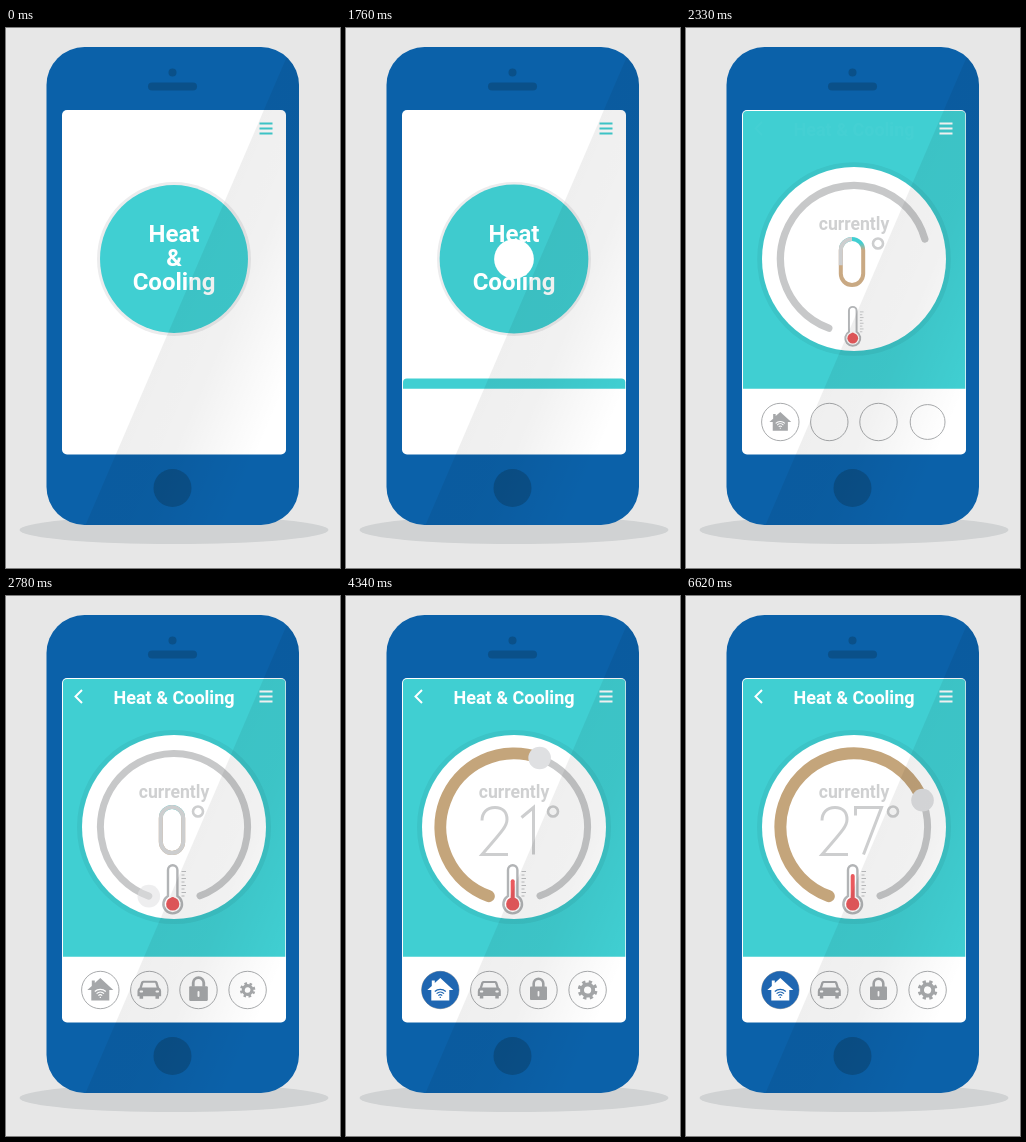
Write an HTML page that moves like this. It is 334 by 540 pixels and loops after 8000 ms.

```html
<!DOCTYPE html>
<html lang="en">
<head>
<meta charset="utf-8">
<title>Heat &amp; Cooling</title>
<style>
  html, body { margin: 0; width: 100%; height: 100%; overflow: hidden; background: #e7e7e7; }
  svg { display: block; width: 334px; height: 540px; }
  text { font-family: Roboto, "Open Sans", sans-serif; font-weight: 700; text-anchor: middle; }
</style>
</head>
<body>
<svg viewBox="0 0 334 540" fill="none">
  <defs>
    <clipPath id="phone"><rect x="40.5" y="19" width="252.5" height="478" rx="38"/></clipPath>
    <clipPath id="upper"><rect x="56" y="82" width="224" height="278.8"/></clipPath>
    <linearGradient id="shade" gradientUnits="userSpaceOnUse" x1="180" y1="262" x2="300" y2="313">
      <stop offset="0" stop-opacity=".062"/>
      <stop offset=".4" stop-opacity=".055"/>
      <stop offset="1" stop-opacity="0"/>
    </linearGradient>
    <linearGradient id="warm" gradientUnits="userSpaceOnUse" x1="0" y1="211" x2="0" y2="222">
      <stop offset=".35" stop-color="#40cfd2"/>
      <stop offset="1" stop-color="#c9a983"/>
    </linearGradient>
  </defs>

  <ellipse cx="168" cy="502" rx="154.5" ry="14" fill="#d0d2d3"/>
  <rect x="40.5" y="19" width="252.5" height="478" rx="38" fill="#0b61a9"/>
  <g fill="#0a5089">
    <circle cx="166.5" cy="44.5" r="4"/>
    <rect x="142" y="54.5" width="49" height="8" rx="4"/>
    <circle cx="166.5" cy="460" r="19"/>
  </g>
  <rect x="56" y="82" width="224" height="344.5" rx="5" fill="#fff"/>

  <g clip-path="url(#upper)">
    <rect id="panel" x="57" width="222.3" height="290" rx="4" fill="#40cfd2"/>
  </g>
  <g id="header" fill="#fff">
    <text x="168" y="107.6" font-size="18">Heat &amp; Cooling</text>
    <path d="M76 94L69.5 100.5L76 107" fill="none" stroke="#fff" stroke-width="2"/>
  </g>
  <path id="menu" d="M253.5 95.5h13M253.5 100.5h13M253.5 105.5h13" stroke-width="2"/>

  <!-- dial -->
  <circle id="halo" cx="168" cy="231" r="77" fill="#ececed"/>
  <circle id="disc" cx="168" cy="231"/>
  <g id="title" fill="#fff" font-size="24">
    <text x="168" y="214.3">Heat</text>
    <text x="168" y="238.3">&amp;</text>
    <text x="168" y="262.3">Cooling</text>
  </g>
  <g stroke="#40cfd2" stroke-width="5.5" stroke-linecap="round">
    <path id="spinA"/><path id="spinB"/>
  </g>
  <circle id="face" cx="168" cy="231" fill="#fff"/>
  <path id="track" stroke="#c7c8c9" stroke-linecap="round"/>
  <path id="heat" stroke="#c4a57b" stroke-width="12" stroke-linecap="round"/>
  <circle id="knob" r="11.3" fill="#dfe0e2"/>
  <g id="label"><text x="168" y="202" font-size="17.6" fill="#cfd0d1">currently</text></g>
  <g id="zero" stroke-width="4">
    <path id="zeroWarm" pathLength="1" stroke="url(#warm)"/>
    <path id="zeroGrey" pathLength="1" stroke="#cdcecf"/>
  </g>
  <g id="digits" stroke="#cdcecf" stroke-width="3" role="img"><path/><path/></g>
  <g id="degree"><circle r="5" stroke="#cdcecf" stroke-width="2.6"/></g>

  <g id="thermo">
    <path d="M162 300V274a4.7 4.7 0 0 1 9.4 0V300a9.3 9.3 0 1 1 -9.4 0Z" fill="#fff" stroke="#b2b4b6" stroke-width="2.4"/>
    <circle cx="166.7" cy="308" r="6.6" fill="#ea5a5d"/>
    <path id="column" stroke="#ea5a5d" stroke-width="4" stroke-linecap="round"/>
    <path id="ticks" stroke="#bfc0c2"/>
  </g>

  <!-- navigation -->
  <g id="nav">
    <g transform="translate(94.3 394)">
      <circle r="18.7" fill="#fff" stroke="#a9abad"/>
      <circle id="active" r="18.7" fill="#1f66b1"/>
      <g class="icon" id="house">
        <path fill="currentColor" d="M0-12L13 0H9V10.500H-9V0H-13L-8.500-4V-9.500H-5.500V-7Z"/>
        <g id="wifi" stroke-width="1.200">
          <path d="M-5.500 1.500A8 8 0 0 1 5.500 1.500M-3.700 3.600A5.400 5.400 0 0 1 3.700 3.600M-1.900 5.600A2.800 2.800 0 0 1 1.900 5.600M-.6 7.300h1.200"/>
        </g>
      </g>
    </g>
    <g transform="translate(143.300 394)">
      <circle r="18.7" fill="#fff" stroke="#a9abad"/>
      <g class="icon">
        <path fill="#a5a7a9" d="M-6-9H6Q7.500-9 8-7.500L9.500-2.500Q11.500-1.500 11.500 1V6H9.500V8.500H6V6H-6V8.500H-9.500V6H-11.500V1Q-11.500-1.500-9.500-2.500L-8-7.500Q-7.500-9-6-9Z"/>
        <path fill="#fff" d="M-5.700-7H5.700L7.200-2.500H-7.200Z"/>
        <path stroke="#fff" stroke-width="2" stroke-linecap="round" d="M-8.500 1.500h1.500M7 1.500h1.500"/>
      </g>
    </g>
    <g transform="translate(192.500 394)">
      <circle r="18.7" fill="#fff" stroke="#a9abad"/>
      <g class="icon">
        <rect x="-8.500" y="-3.500" width="17" height="13.500" rx="1" fill="#a5a7a9"/>
        <path stroke="#a5a7a9" stroke-width="2.600" d="M-4.800-3V-6.500a4.800 4.800 0 0 1 9.600 0V-3"/>
        <path stroke="#fff" stroke-width="1.800" stroke-linecap="round" d="M0 1.800V5.500"/>
      </g>
    </g>
    <g transform="translate(241.600 394)">
      <circle r="18.700" fill="#fff" stroke="#a9abad"/>
      <g class="icon"><g id="gear" stroke="#a5a7a9">
        <circle r="5.600" stroke-width="4"/>
        <circle r="8.100" stroke-width="3.600" pathLength="16" stroke-dasharray="1"/>
      </g></g>
    </g>
  </g>

  <path clip-path="url(#phone)" d="M285 19H293V497H79.500Z" fill="url(#shade)"/>
</svg>

<script>
const $ = id => document.getElementById(id);
const set = (el, attrs) => { for (const k in attrs) el.setAttribute(k, attrs[k]); };
const lerp = (a, b, p) => a + (b - a) * p;
const show = (el, on) => { el.style.display = on ? '' : 'none'; };

const linear = x => x;
const quad = x => x < .5 ? 2 * x * x : 1 - 2 * (1 - x) ** 2;
const cubic = x => x < .5 ? 4 * x ** 3 : 1 - 4 * (1 - x) ** 3;
const backOut = x => 1 + 2.7 * (x - 1) ** 3 + 1.7 * (x - 1) ** 2;
const lateSmooth = x => { const y = x ** 1.68; return y * y * (3 - 2 * y); };
const tween = (t, from, to, ease = quad) =>
  ease(Math.min(1, Math.max(0, (t - from) / (to - from))));

const LOOP = 8000, CX = 168, CY = 231, R = 73.6, START = 110;
const polar = (r, deg) => {
  const a = deg * Math.PI / 180;
  return [CX + r * Math.cos(a), CY + r * Math.sin(a)];
};
const arc = (r, from, span) =>
  `M${polar(r, from)}A${r} ${r} 0 ${span > 180 ? 1 : 0} 1 ${polar(r, from + span)}`;
const mix = (a, b, p) => `rgb(${a.map((v, i) => Math.round(lerp(v, b[i], p)))})`;
const scaleAt = (x, y, s) => `translate(${x} ${y}) scale(${s}) translate(${-x} ${-y})`;

const TEAL = [64, 207, 210], RING = [60, 196, 199], WHITE = [255, 255, 255];
const GREY = [165, 167, 169], BLUE = [31, 102, 177];

// Thin numerals as strokes in a 26 x 47 box; 9 is 6 turned round.
const GLYPHS = [
  'M13 0C4 0 0 5 0 13V34C0 42 4 47 13 47S26 42 26 34V13C26 5 22 0 13 0Z',
  'M6 10L18 0V47',
  'M0 13C0 5 5 0 13 0S25 5 25 12 19 25 0 47H26',
  'M1 9A12 11 0 1 1 12 22A13 12.5 0 1 1 0 36',
  'M16 0L0 36H26M19 22V47',
  'M24 0H3L2 21A13 15 0 1 1 0 37',
  'M18 0L2 27A13 14 0 1 0 6 22',
  'M0 8V0H26L8 47',
  'M13 22A12 11 0 1 1 13.1 22A13 12.5 0 1 1 13 22'
];

const zeroPath = 'M166 211a11.2 11.2 0 0 0 -11.2 11.2v23.6a11.2 11.2 0 0 0 22.4 0v-23.6a11.2 11.2 0 0 0 -11.200 -11.200';
set($('zeroWarm'), { d: zeroPath });
set($('zeroGrey'), { d: zeroPath });
set($('ticks'), { d: Array.from({ length: 8 }, (_, i) =>
  `M175.500 ${275.500 + i * 3.500}h${i % 2 ? 3 : 4.500}`).join('') });

const navItems = [...$('nav').children];
const icons = [...document.querySelectorAll('.icon')];
const digitPaths = [...$('digits').children];

function drawNumber(n) {
  const chars = [...String(n)].map(Number);
  set($('digits'), { 'aria-label': n });
  digitPaths.forEach((path, i) => {
    show(path, i < chars.length);
    if (i >= chars.length) return;
    const x = chars.length > 1 ? 136 + i * 33.5 : 153;
    const flip = chars[i] === 9;
    set(path, {
      d: GLYPHS[flip ? 6 : chars[i]],
      transform: `translate(${x} 211.500)` + (flip ? ' rotate(180 13 23.500)' : '')
    });
  });
}

function drawTrim(el, p) {
  show(el, p > 0);
  set(el, { 'stroke-dasharray': p < 1 ? `${p} 2` : 'none' });
}

function drawSpinner(t) {
  const grow = tween(t, 500, 1220, linear), out = tween(t, 1270, 1560);
  const tail = 23 - 180 * (1 - grow) + tween(t, 1220, 1560, linear) * 85;
  [['spinA', 180, 63.6], ['spinB', 0, 106]].forEach(([id, offset, span]) => {
    const len = span * grow * (1 - out);
    show($(id), len > .5);
    set($(id), { d: arc(85, tail + offset + span * out, len) });
  });
}

function drawDial(t) {
  const face = 92 * tween(t, 1500, 2294);
  show($('halo'), t < 1950);
  show($('title'), face < 75);
  set($('disc'), {
    r: lerp(74, 97, tween(t, 1700, 2374)),
    fill: mix(TEAL, RING, tween(t, 1600, 2000))
  });
  set($('face'), { r: face });

  const drawn = tween(t, 1950, 2550);
  show($('track'), drawn > 0);
  set($('track'), {
    d: arc(R, START, 319.300 * drawn),
    'stroke-width': lerp(8, 7, tween(t, 2060, 2500))
  });
  const label = tween(t, 1880, 2240);
  set($('label'), { transform: scaleAt(168, 195.500, label) });
  drawTrim($('zeroWarm'), tween(t, 1850, 2260, linear));
  drawTrim($('zeroGrey'), tween(t, 2220, 2620, linear));
}

function drawReading(t) {
  const rise = tween(t, 3350, 4520, cubic);
  const drop = tween(t, 4850, 5600, lateSmooth);
  const again = tween(t, 5900, 6620, cubic);
  const follow = (a, b, c, d) => lerp(lerp(lerp(a, b, rise), c, drop), d, again);
  const sweep = follow(0, 183, 119.700, 228.600);
  const value = Math.round(follow(0, 21, 18, 27));

  show($('heat'), rise > 0);
  set($('heat'), { d: arc(R, START, Math.max(.1, sweep)) });
  const [cx, cy] = polar(R, START + sweep);
  set($('knob'), { cx, cy, opacity: tween(t, 2640, 2900, linear) });

  const counting = t >= 3350;
  show($('zero'), !counting);
  show($('digits'), counting);
  if (counting) drawNumber(value);

  const x = value > 9 ? 207 : 192;
  set($('degree'), { transform: `translate(${x} 215.500) scale(${tween(t, 1950, 2250)})` });

  set($('thermo'), { transform: scaleAt(167, 320, tween(t, 1950, 2500)) });
  set($('column'), { d: `M166.700 308V${follow(303, 285, 288, 280)}` });
}

function drawNav(t) {
  navItems.forEach((item, i) => {
    const from = 1950 + i * 70;
    item.firstElementChild.setAttribute('r', 18.700 * tween(t, from, from + 210));
    show(item, t > from);
    const s = tween(t, 2200 + i * 155, 2700 + i * 155, backOut);
    set(icons[i], { transform: `scale(${Math.max(0, s)})` });
  });
  const on = tween(t, 3200, 3600);
  set($('active'), { r: 18.700 * on });
  $('house').style.color = mix(GREY, WHITE, on);
  set($('wifi'), { stroke: mix(WHITE, BLUE, on) });
  set($('gear'), { transform: `rotate(${11 + 180 * tween(t, 2665, 4520)})` });
}

function render(t) {
  const up = tween(t, 1687, 2226);
  set($('panel'), { y: lerp(361, 83, up) });
  set($('header'), { opacity: tween(t, 2300, 2620) });
  set($('menu'), { stroke: mix(TEAL, WHITE, tween(t, 2090, 2240)) });
  drawSpinner(t);
  drawDial(t);
  drawReading(t);
  drawNav(t);
}

const origin = performance.now();
function loop() {
  render((performance.now() - origin) % LOOP);
  requestAnimationFrame(loop);
}
loop();
</script>
</body>
</html>
```
